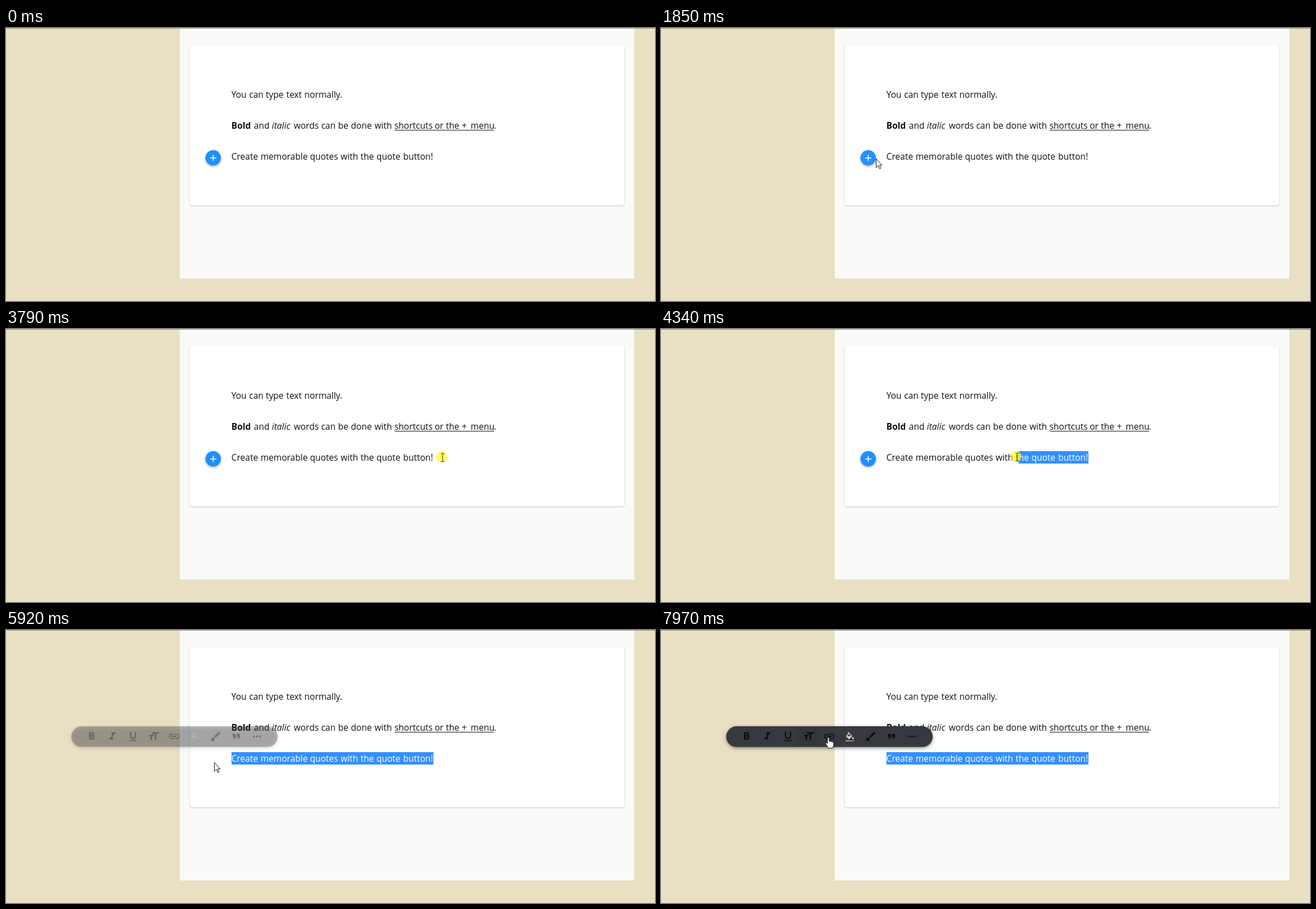
Recreate the animation shown at these times as an HTML page with a canvas. Size 1154 px wide and 485 px high, loop 8 s.

```html
<!DOCTYPE html>
<html lang="en">
<head>
<meta charset="utf-8">
<title>Quote editor</title>
<style>
  html, body { margin: 0; width: 100%; height: 100%; overflow: hidden; background: #e9e0c3; }
  canvas { display: block; }
</style>
</head>
<body>
<canvas id="stage" width="1154" height="485"></canvas>
<script>
const ctx = document.getElementById('stage').getContext('2d');
const LOOP = 8000;
const FAMILY = '15.5px "Open Sans", "Noto Sans", sans-serif';
const LEFT = 400.8, RIGHT = 760.2;
const BUTTON = { x: 368.4, y: 230.6, r: 13.7 };
const BAR = { x: 116, y: 171, w: 367, h: 36.8 };

// Each word with its left edge.
const intro = [['You', 400.8], ['can', 432.3], ['type', 462], ['text', 498.5], ['normally.', 530.5]];
const styled = [['and', 440.8], ['words', 511.7], ['can', 560.4], ['be', 590.4], ['done', 613.3],
  ['with', 655.3], ['shortcuts', 690.7], ['or', 762.2], ['the', 782.2], ['+', 810.6], ['menu', 826.3], ['.', 867.6]];
const quote = [['Create', 400.8], ['memorable', 452.7], ['quotes', 540.5], ['with', 595.1],
  ['the', 630.6], ['quote', 658.7], ['button!', 706.3]];

// Pointer moves: start, end, number of steps, points spread evenly along the way.
const moves = [
  [150, 920, 11, [[640, 452], [520, 454], [380, 425], [260, 375], [220, 330], [263, 298]]],
  [1010, 1770, 11, [[270, 295], [318, 265], [355, 243], [374, 234], [382, 232]]],
  [2080, 2230, 3, [[385, 232], [404, 238]]],
  [2470, 2540, 2, [[404, 234], [405, 231]]],
  [2770, 2850, 2, [[406, 235], [407, 238]]],
  [3010, 3790, 11, [[402, 238], [538, 230], [668, 216], [777, 229]]],
  [3870, 3870, 1, [[780, 229]]],
  [4030, 4820, 11, [[785, 227], [715, 227], [633.6, 228], [550, 229], [480, 233], [433, 237]]],
  [4900, 5140, 4, [[425, 238], [411.5, 241]]],
  [5300, 5370, 2, [[407, 241], [403.6, 240.5]]],
  [5610, 5760, 3, [[395, 238], [371, 236]]],
  [5920, 6080, 3, [[370, 235], [371, 232]]],
  [6630, 7260, 9, [[361, 232], [300, 212], [250, 200], [218, 195]]],
  [7500, 7970, 7, [[225, 193], [255, 186], [297.5, 190.5]]]
];

const arrow = new Path2D('M.5.5V16L4.2 12.6 6.6 18 9 17 6.6 11.7H11Z');
const hand = new Path2D('M-1.5 1.2q1.5-2 3 0V7q2.6-1 3 .8 2.4-.8 2.8.8 2.2-.5 2.2 1.4v5L7.5 19.5H-.5V18L-5 11.5q-.6-2.2 1.2-2L-1.5 11.5Z');

// Toolbar icons on a 24 unit grid.
const icons = [
  'M15.6 10.8c1-.7 1.65-1.8 1.65-2.8 0-2.3-1.75-4-4-4H7v14h7c2.1 0 3.7-1.7 3.7-3.8 0-1.5-.8-2.8-2.1-3.4zM10 6.5h3a1.5 1.5 0 0 1 0 3h-3zm3.5 9H10v-3h3.5a1.5 1.5 0 0 1 0 3z',
  'M10 4v3h2.2l-3.4 8H6v3h8v-3h-2.2l3.4-8H18V4z',
  'M12 17a6 6 0 0 0 6-6V3h-2.5v8a3.5 3.5 0 0 1-7 0V3H6v8a6 6 0 0 0 6 6zm-7 2v2h14v-2z',
  'M9 4v3h5v12h3V7h5V4zM3 12h3v7h3v-7h3V9H3z',
  'M3.9 12A3.1 3.1 0 0 1 7 8.9h4V7H7a5 5 0 0 0 0 10h4v-1.9H7A3.1 3.1 0 0 1 3.9 12zM8 13h8v-2H8zm9-6h-4v1.9h4a3.1 3.1 0 0 1 0 6.2h-4V17h4a5 5 0 0 0 0-10z',
  'M16.5 9 7.6 0 6.2 1.4l2.4 2.4L3.4 9q-1 1 0 2l5.5 5.5q1.1 1 2.2 0l5.4-5.5q1-1 0-2zM5.2 10 10 5.2 14.8 10zM19 11.5s-2 2.2-2 3.5a2 2 0 0 0 4 0c0-1.3-2-3.5-2-3.5z',
  'M7 14a3 3 0 0 0-3 3c0 1.3-1.2 2-2 2 .9 1.2 2.5 2 4 2a4 4 0 0 0 4-4 3 3 0 0 0-3-3zM20.7 4.6l-1.3-1.3q-.7-.6-1.4 0L9 12.25 11.75 15 20.7 6q.6-.7 0-1.4z',
  'M6 17h3l2-4V7H5v6h3zm8 0h3l2-4V7h-6v6h3z',
  'M4 12a2 2 0 1 0 4 0 2 2 0 1 0-4 0M10 12a2 2 0 1 0 4 0 2 2 0 1 0-4 0M16 12a2 2 0 1 0 4 0 2 2 0 1 0-4 0'
].map(d => new Path2D(d));

function withState(draw) {
  ctx.save();
  draw();
  ctx.restore();
}

function box(x, y, w, h, color) {
  ctx.fillStyle = color;
  ctx.fillRect(x, y, w, h);
}

function disc(x, y, r, color) {
  ctx.fillStyle = color;
  ctx.beginPath();
  ctx.arc(x, y, r, 0, Math.PI * 2);
  ctx.fill();
}

function roundBox(x, y, w, h, r, color) {
  ctx.fillStyle = color;
  ctx.beginPath();
  ctx.roundRect(x, y, w, h, r);
  ctx.fill();
}

function shadow(alpha, blur, dy) {
  ctx.shadowColor = `rgba(0,0,0,${alpha})`;
  ctx.shadowBlur = blur;
  ctx.shadowOffsetY = dy;
}

function words(list, y, style = '') {
  ctx.font = style + FAMILY;
  for (const [word, x] of list) ctx.fillText(word, x, y);
}

function pointerAt(t) {
  const move = moves.filter(m => m[0] <= t).pop();
  if (!move) return null;
  const [start, end, steps, pts] = move;
  const last = steps - 1;
  const step = last ? Math.min(last, Math.floor((t - start) / (end - start) * last + 0.1)) : 0;
  const u = last ? step / last * (pts.length - 1) : 0;
  const i = Math.min(Math.floor(u), Math.max(0, pts.length - 2));
  const a = pts[i], b = pts[i + 1] || a, f = u - i;
  return { x: a[0] + (b[0] - a[0]) * f, y: a[1] + (b[1] - a[1]) * f };
}

// Character boundaries of the quote line, for the text selection.
ctx.font = FAMILY;
const edges = [RIGHT];
for (const [word, x] of quote)
  for (let i = 0; i < word.length; i++) edges.push(x + ctx.measureText(word.slice(0, i)).width);

function selectionStart(t, p) {
  if (t < 3870) return RIGHT;
  if (t < 4030 || t >= 5370) return LEFT;
  return edges.reduce((best, e) => Math.abs(e - p.x) < Math.abs(best - p.x) ? e : best);
}

function drawPage() {
  box(0, 0, 1154, 485, '#e9e0c3');
  box(309, 0, 808, 445, '#fafafa');
  box(0, 0, 1154, 1, '#8f8a7e');
  withState(() => {
    shadow(0.22, 3, 1);
    roundBox(327, 30, 772, 285, 4, '#fff');
  });
  ctx.fillStyle = '#111';
  words(intro, 124);
  words(styled, 179);
  words([['Bold', 400.8]], 179, 'bold ');
  words([['italic', 472.8]], 179, 'italic ');
  box(691, 181, 177, 1, '#111');
  ctx.fillStyle = '#111';
  words(quote, 234);
}

function drawSelection(x) {
  if (x >= RIGHT) return;
  withState(() => {
    ctx.beginPath();
    ctx.rect(Math.round(x), 217, 760 - Math.round(x), 22);
    ctx.clip();
    box(LEFT, 217, 360, 22, '#3390ff');
    ctx.fillStyle = '#fff';
    words(quote, 234);
  });
}

function drawButton(p) {
  const { x, y, r } = BUTTON;
  const over = p && Math.hypot(p.x - x, p.y - y) < r + 0.3;
  withState(() => {
    shadow(0.35, 4, 1.5);
    disc(x, y, r, over ? '#2493ff' : '#1e90ff');
  });
  box(363, 230, 11, 1.6, '#fff');
  box(367.7, 225.3, 1.6, 11, '#fff');
}

function drawBar(alpha, hover) {
  withState(() => {
    ctx.globalAlpha = alpha;
    withState(() => {
      shadow(0.45, 6, 2);
      roundBox(BAR.x, BAR.y, BAR.w, BAR.h, 18.4, '#36393f');
    });
    icons.forEach((icon, i) => {
      const x = 152.3 + i * 36.75, fill = i === 5;
      if (hover && hover.y < 208 && Math.abs(hover.x - x) < 18.4)
        box(x - 18.4, BAR.y, 36.8, BAR.h, 'rgba(0,0,0,.06)');
      withState(() => {
        const s = fill ? 0.78 : 0.92;
        ctx.translate(x - 12 * s, fill ? 180.7 : 189 - 12 * s);
        ctx.scale(s, s);
        ctx.fillStyle = fill ? '#cfd0d2' : '#0d0e10';
        ctx.fill(icon, 'evenodd');
      });
      if (fill) {
        box(x - 8, 196, 8, 1.7, '#d9a68c');
        box(x, 196, 7.5, 1.7, '#8f8d91');
      }
    });
  });
}

function drawShape(path, p) {
  withState(() => {
    ctx.translate(p.x, p.y);
    ctx.lineJoin = 'round';
    ctx.lineWidth = 1;
    ctx.fillStyle = '#fff';
    ctx.strokeStyle = '#111';
    ctx.fill(path);
    ctx.stroke(path);
  });
}

function drawBeam({ x, y }) {
  const cx = Math.round(x) - 0.5, top = Math.round(y) - 7.5, bottom = top + 14;
  ctx.strokeStyle = '#3a3a2c';
  ctx.lineWidth = 1;
  ctx.beginPath();
  for (const end of [top, bottom]) {
    ctx.moveTo(cx - 3, end);
    ctx.lineTo(cx + 3, end);
  }
  ctx.moveTo(cx, top);
  ctx.lineTo(cx, bottom);
  ctx.stroke();
}

function drawPointer(t, p) {
  if (t >= 2230 && t < 5610) {
    if (t >= 3010) disc(p.x - 2.5, p.y - 1.7, 10, 'rgba(255,250,0,.6)');
    drawBeam(p);
  } else {
    drawShape(t > 6630 && p.y < 208 ? hand : arrow, p);
  }
}

function render(t) {
  const p = pointerAt(t);
  drawPage();
  drawSelection(selectionStart(t, p));
  if (t < 5920) drawButton(p);
  else drawBar(Math.min(1, (Math.floor((t - 5920) / 80) + 1) / 3), pointerAt(t - 150));
  if (p) drawPointer(t, p);
}

const begin = performance.now();
function tick() {
  render((performance.now() - begin) % LOOP);
  requestAnimationFrame(tick);
}
tick();
</script>
</body>
</html>
```
